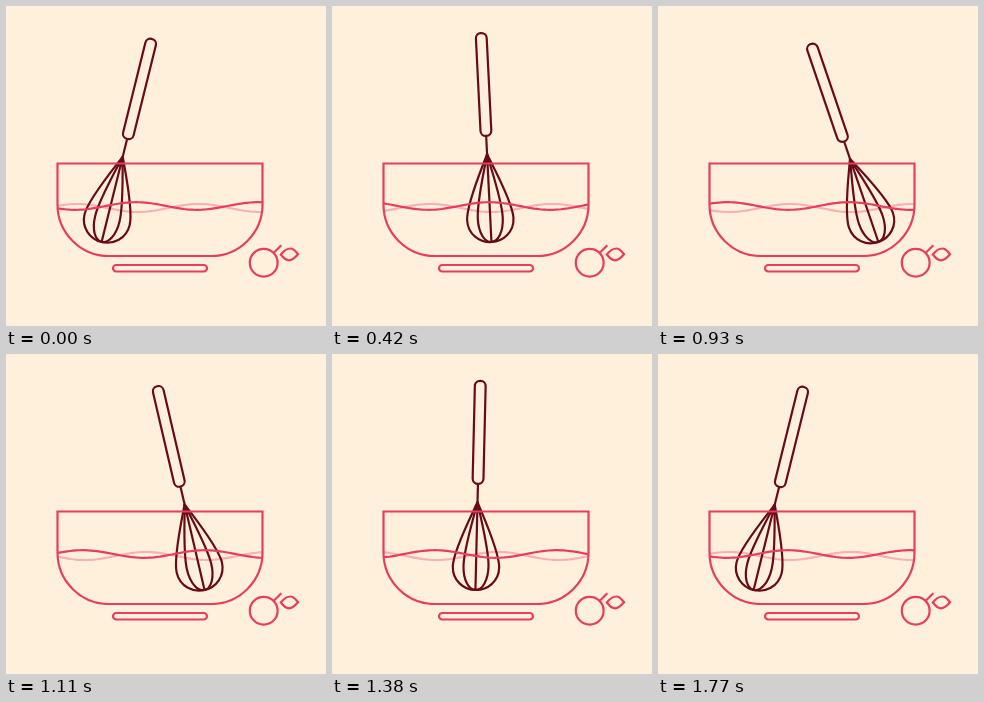
Write an HTML page that moves like this. It is 320 px wide and 320 px high and loops after 1800 ms.

```html
<!DOCTYPE html>
<html lang="en">
<head>
<meta charset="utf-8">
<title>Whisk and bowl</title>
<style>
  html, body { margin: 0; width: 100%; height: 100%; overflow: hidden; background: #fef0db; }
  svg { display: block; width: 100vw; height: 100vh; fill: none; stroke-width: 2.2; }
  .red { stroke: #e63e5c; }
  .pink { stroke: #f8b2b4; }
  .dark { stroke: #680b18; }
</style>
</head>
<body>
<svg viewBox="0 0 320 320">
  <path id="back" class="pink"/>

  <!-- The origin is the lowest point of the whisk -->
  <g id="whisk" class="dark">
    <rect x="-5.4" y="-209.2" width="10.8" height="103" rx="5.2"/>
    <path d="M0-106.2V-86"/>
    <path d="M0-90L-3.6-79H3.6Z" fill="#680b18" stroke="none"/>
    <path d="M0-88C-5-76-23.2-39-23.2-23C-23.2-9-12 0 0 0S23.2-9 23.2-23C23.2-39 5-76 0-88"/>
    <path d="M0-88C-4-70-12.5-41-12.5-24C-12.5-10-7 0 0 0S12.5-10 12.5-24C12.5-41 4-70 0-88V0"/>
  </g>

  <g class="red">
    <path id="front"/>
    <path d="M51.5 157.5H256.5V198.5A51.5 51.5 0 0 1 205 250H103A51.5 51.5 0 0 1 51.5 198.5Z"/>
    <rect x="107" y="259" width="94" height="6.5" rx="3.25"/>
    <circle cx="257.7" cy="256.7" r="13.9"/>
    <path d="M267.5 247L275.3 239.3"/>
    <path d="M274.8 248.5C279 243.5 281 242.5 284.5 242.5S289.5 245.5 292 248.3C288 253 286 254.3 283 254.3S277.5 252 274.8 248.5Z"/>
  </g>
</svg>
<script>
  const LOOP = 1800, STEP = 30, TURN = 840, RETURN = 1770;
  const LEFT = 52, RIGHT = 256, WAVELENGTH = 122;
  const get = id => document.getElementById(id);
  const ease = p => (1 - Math.cos(Math.PI * Math.min(1, Math.max(0, p)))) / 2;
  const mix = (a, b, p) => a + (b - a) * p;

  function wave(peak, level, height) {
    const points = [];
    for (let x = LEFT; x <= RIGHT; x += 3) {
      const y = level - height * Math.cos(2 * Math.PI * (x - peak) / WAVELENGTH);
      points.push(x + ' ' + y.toFixed(2));
    }
    return 'M' + points.join('L');
  }

  function draw(now) {
    const t = Math.floor(now % LOOP / STEP) * STEP;
    const swing = ease(t / TURN) - ease((t - TURN) / (RETURN - TURN));
    const x = mix(95.6, 223.3, swing), angle = mix(13.9, -19.6, swing);
    get('whisk').setAttribute('transform', `translate(${x} 236) rotate(${angle})`);

    // The waves move on by half a wavelength in each half of the loop
    const half = t / LOOP * 2;
    const peak = 130 + WAVELENGTH / 2 * (ease(half) + ease(half - 1));
    get('front').setAttribute('d', wave(peak, 200, 3.8));
    get('back').setAttribute('d', wave(peak + WAVELENGTH / 2 + 2, 202, 4));
  }

  const start = performance.now();
  function tick() {
    draw(performance.now() - start);
    requestAnimationFrame(tick);
  }
  tick();
</script>
</body>
</html>
```
